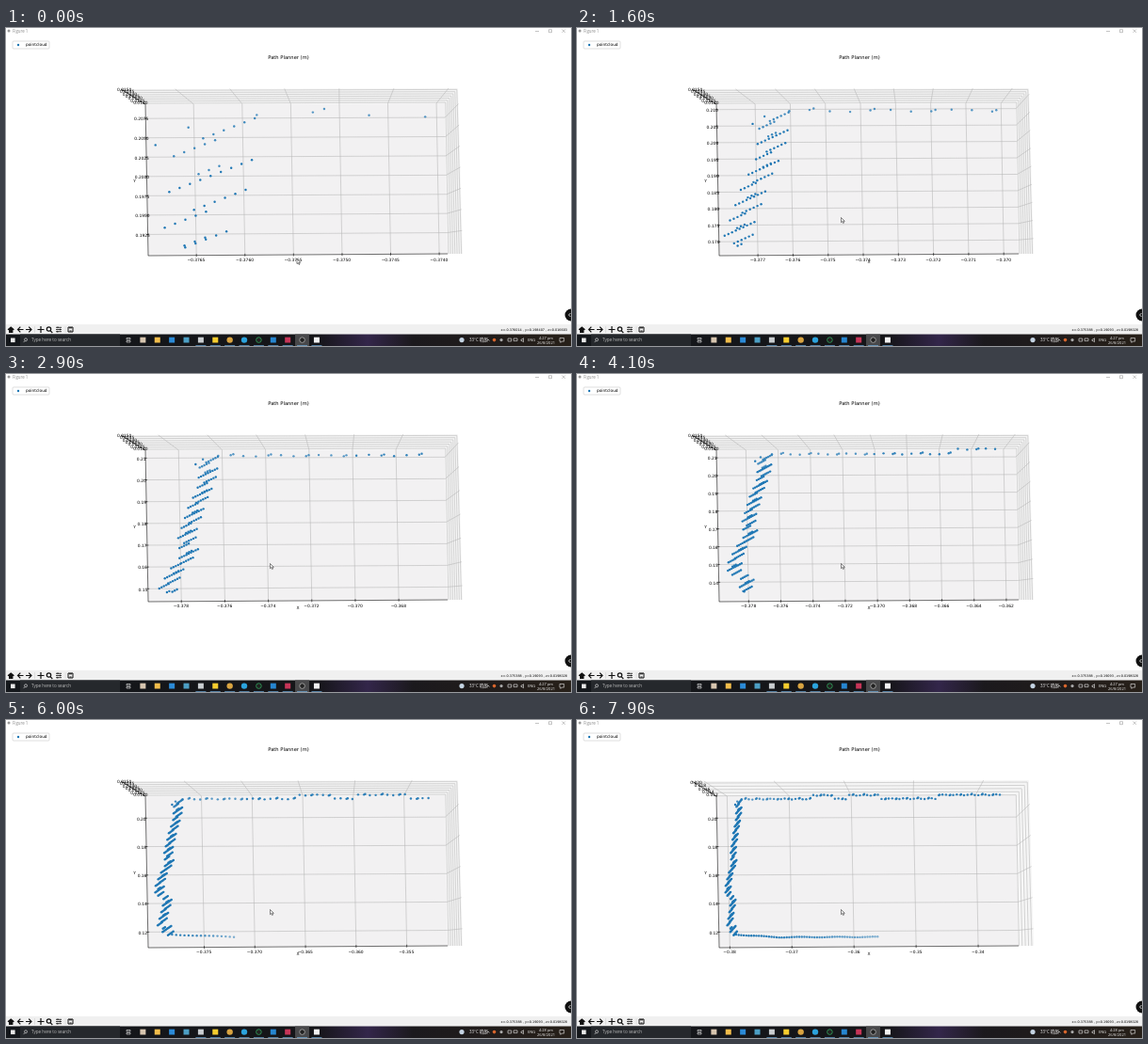
These frames come from a looping animation (600x338 px, 8 s). An HTML page:

```html
<!DOCTYPE html>
<html lang="en">
<head>
<meta charset="utf-8">
<title>Path Planner</title>
<style>
html, body { margin: 0; width: 100%; height: 100%; overflow: hidden; background: #fff; }
svg { display: block; width: 100vw; height: 100vh; }
text { font-family: "DejaVu Sans", sans-serif; font-size: 4.4px; }
.ui { font-family: "Open Sans", "Noto Sans CJK SC", "Noto Sans CJK", sans-serif; }
.mid { text-anchor: middle; }
.grid { fill: none; stroke: #b4b4b4; stroke-width: .55; }
.axis { fill: none; stroke: #111; stroke-width: .6; }
.tool { fill: none; stroke: #111; stroke-width: 1.2; }
.thin { fill: none; stroke: #eee; stroke-width: .6; }
</style>
</head>
<body>
<svg viewBox="0 0 600 338" preserveAspectRatio="none">
  <defs>
    <linearGradient id="bar">
      <stop offset="0" stop-color="#14171b"/><stop offset=".55" stop-color="#151518"/>
      <stop offset=".64" stop-color="#33264a"/><stop offset=".72" stop-color="#1b191d"/>
      <stop offset="1" stop-color="#272019"/>
    </linearGradient>
  </defs>
  <rect width="600" height="338" fill="#fff"/>
  <circle cx="3" cy="3" r="1.5" fill="#999"/>
  <text class="ui" x="7" y="4.8" fill="#888">Figure 1</text>
  <path d="M562 3.5h4M576.5 1.7h3v3h-3zM590.5 1.5l3.4 3.4m0-3.4l-3.4 3.4" fill="none" stroke="#888" stroke-width=".5"/>
  <rect x="7" y="14" width="39" height="8" rx="1" fill="#fff" stroke="#ccc" stroke-width=".6"/>
  <circle cx="13" cy="18" r="1.2" fill="#1f77b4"/>
  <text x="21" y="19.4" style="font-size:4.3px">pointcloud</text>
  <text class="mid" x="300" y="33" style="font-size:5.2px">Path Planner (m)</text>

  <g id="plot"></g>

  <rect y="315" width="600" height="10.5" fill="#f0f0f0"/>
  <g class="tool">
    <path d="M2 320.8l3.2-2.8 3.2 2.8M3.6 320.5v3h3.2v-3z" fill="#111"/>
    <path d="M18.5 320.5h-6m2.8-2.8l-2.8 2.8 2.8 2.8M21 320.5h6m-2.8-2.8l2.8 2.8-2.8 2.8"/>
    <path d="M33.5 320.5h7M37 317v7"/>
    <circle cx="45.5" cy="320" r="2.2"/><path d="M47 321.7l2.3 2.3"/>
    <path d="M53 318.3h6M53 320.5h6M53 322.7h6M55 317.4v1.8M57.4 319.6v1.8M54.8 321.8v1.8" stroke-width=".8"/>
    <path d="M66 318h5v5h-5zM67 318.8h3M67.5 322h2" stroke-width="1"/>
  </g>
  <path d="M30.5 317v7M63 317v7" stroke="#ccc" stroke-width=".5"/>
  <text id="status" x="596" y="322" text-anchor="end" style="font-size:3.4px"></text>
  <circle cx="600" cy="305" r="6.5" fill="#111"/>
  <path d="M599.5 303l-2 2 2 2" fill="none" stroke="#fff" stroke-width=".8"/>

  <rect y="325.5" width="600" height="12.5" fill="url(#bar)"/>
  <rect x="15" y="325.5" width="106" height="12.5" fill="#25282c"/>
  <rect x="5" y="329.5" width="4.6" height="4.6" fill="#e8e8e8"/>
  <circle class="thin" cx="21" cy="331.3" r="1.5"/>
  <path class="thin" d="M20 332.5l-1.4 1.6"/>
  <text class="ui" x="27" y="333.4" fill="#bbb" style="font-size:4.6px">Type here to search</text>
  <g id="icons"></g>
  <g fill="#eee">
    <circle cx="484" cy="331.6" r="2.6" fill="#c4d3e2"/>
    <text class="ui" x="492" y="333.4">33°C 晴朗</text>
    <path class="thin" d="M510.5 332.5l1.5-1.5 1.5 1.5M533 330h3.6v3h-3.6zM539 330h4v2.6h-4zM547 331v1.5h1l1.5 1.2v-4l-1.5 1.3z"/>
    <circle cx="518.5" cy="331.6" r="1.8" fill="#d9662d"/><circle cx="526" cy="331.6" r="1.6" fill="#aaa"/>
    <text class="ui" x="554" y="333.2" style="font-size:4px">ENG</text>
    <text class="ui mid" id="clock" x="573.5" y="330.5" style="font-size:4px"></text>
    <text class="ui mid" x="573.5" y="336.3" style="font-size:4px">26/8/2021</text>
    <path class="thin" d="M588 329.5h4.6v3.6h-2.4l-1.2 1.3v-1.3h-1z"/>
  </g>
  <path id="cursor" d="M0 0v5.2l1.3-1.1 .8 1.9 .9-.4-.8-1.8h1.6z" fill="#fff" stroke="#111" stroke-width=".5"/>
</svg>
<script>
const LOOP = 8000, STEP = 100;
const $ = id => document.getElementById(id);
const mix = (a, b, k) => a + (b - a) * k;

// piecewise linear curve through a few points, flat outside them
const curve = (...pts) => x => {
  const i = pts.findIndex(p => p[0] > x);
  if (i < 0) return pts[pts.length - 1][1];
  if (!i) return pts[0][1];
  const [a, b] = [pts[i - 1], pts[i]];
  return mix(a[1], b[1], (x - a[0]) / (b[0] - a[0]));
};

// extents of the scanned cloud over seconds; x in 1e-5 from -0.38, y in 1e-4
const right = curve([0, 589], [1.6, 988], [2.9, 1337], [4.1, 1758], [6, 2715], [7.2, 3712], [7.9, 4344]);
const left = curve([0, 320], [1.6, 244], [2.9, 135]);
const low = curve([0, 1910], [1.6, 1687], [2.9, 1485], [4.1, 1345], [5, 1158]);
const high = curve([0, 2081], [2.9, 2092], [5, 2086]);
const trailEnd = curve([4.9, 0], [5, 300], [6, 903], [7.9, 2464]);

// left edge of the slanted scan rows at height y
const edge = curve([1170, 255], [1240, 182], [1345, 225], [1412, 247], [1433, 165], [1495, 167],
  [1575, 213], [1640, 268], [1705, 252], [1865, 308], [1920, 342], [2040, 356]);

const cloud = [];
const add = (x, y, alpha = 1) => cloud.push({x, y, alpha});
for (let i = 0, y = 2040; y > 1175; i++, y -= 21.6)
  for (let j = 0; j < [6, 5, 3, 9][i % 4]; j++)
    add(edge(y) + 13 * Math.cos(Math.PI * i) + 10 * j, y + 4.8 * j, y > 1985 ? .85 : 1);
add(323, 2032);
add(355, 2053, .85);

const raised = x => x > 1476 && x < 1780 || x > 2024 && x < 2500 || x > 3380;
for (let i = 0, x = 421; x < 4400; i++, x += 54) {
  const y = (raised(x) ? 2092 : 2068) + 3 * Math.sin(1.7 * i), alpha = x < 1000 ? .75 : .92;
  add(x, y, alpha);
  if (i % 3 === 1) add(x + 11, y + 4, alpha);
}

function ticks(lo, hi) {
  const raw = (hi - lo) / 9.375, mag = 10 ** Math.floor(Math.log10(raw));
  const step = mag * [1, 2, 2.5, 5, 10].find(s => s * mag >= raw * .9999);
  let digits = 2;
  while (digits < 5 && Math.abs(step * 10 ** digits - Math.round(step * 10 ** digits)) > 1e-6) digits++;
  const pad = .02 * (hi - lo), list = [];
  for (let n = Math.ceil((lo + pad) / step); n * step <= hi - pad; n++)
    list.push([(n * step - lo) / (hi - lo), (n * step).toFixed(digits).replace("-", "−")]);
  return list;
}

// fx runs right, fy runs down, w rises from floor to lid
const project = (fx, fy, w = 0) => [
  mix(148 + 3 * fy + 318 * fx, 122 - 4 * fy + fx * (358 + 9 * fy), w),
  mix(81 - fx + fy * (161 - fx), 65 - fx + 176 * fy, w)
];
const line = (...pts) => "M" + pts.map(p => p.map(v => v.toFixed(2)).join(" ")).join("L");
const label = (x, y, s) => `<text class="mid" x="${x.toFixed(2)}" y="${y.toFixed(2)}">${s}</text>`;
const widen = (a, b) => [a - .073 * (b - a), b + .073 * (b - a)];

function plot(t) {
  let grid = "", marks = "", labels = "", dots = "";
  const P = project;
  const [x0, x1] = widen(left(t), right(t)), [y0, y1] = widen(low(t), high(t));
  const lid = t < 7.3 ? .0153 : .0212;

  for (const [f, s] of ticks(x0 * 1e-5 - .38, x1 * 1e-5 - .38)) {
    const [x, y] = P(f, 1);
    grid += line([x, y], P(f, 0), P(f, 0, 1));
    marks += line([x, y - 1.5], [x, y + 1.5]);
    labels += label(x - .3, 248, s);
  }
  for (const [f, s] of ticks(y0 * 1e-4, y1 * 1e-4)) {
    const fy = 1 - f, [x, y] = P(0, fy);
    grid += line([x, y], P(1, fy), P(1, fy, 1));
    marks += line([x - 1.5, y], [x + 1.5, y]);
    labels += label(143.5 + 2 * fy, y + 2.3, s);
  }
  for (const [w, s] of ticks(.0118, lid)) {
    const [x, y] = P(0, 0, w);
    grid += line([x, y], P(1, 0, w), P(1, 1, w));
    marks += line([x - 1.5, y - .5], [x + 1.5, y + .5]);
    labels += label(x - 4 + 6 * w, y + .8, s);
  }

  const dot = (x, y, alpha) => {
    const fx = (x - x0) / (x1 - x0), fy = (y1 - y) / (y1 - y0);
    const px = 132.7 + 3.3 * fy + 340.3 * fx, py = 70.4 + 172.3 * fy - fx;
    dots += `<circle cx="${px.toFixed(2)}" cy="${py.toFixed(2)}" r="1.2" opacity="${alpha.toFixed(2)}"/>`;
  };
  for (const {x, y, alpha} of cloud)
    if (x <= right(t) && y >= low(t) - 3) dot(x, y, alpha);
  for (let x = 300, end = trailEnd(t); x <= end; x += 38)
    dot(x, 1180 - 18 * Math.min(1, (x - 300) / 600) + 2 * Math.sin(x / 90), 1 - .5 * (x / end) ** 2);

  const pane = (fill, ...pts) => `<path d="${line(...pts)}Z" fill="${fill}"/>`;
  return pane("#f2f1f2", P(0, 0), P(1, 0), P(1, 1), P(0, 1)) +
    pane("#f5f5f5", P(0, 0), P(0, 0, 1), P(1, 0, 1), P(1, 0)) +
    pane("#f6f6f6", P(1, 0), P(1, 0, 1), P(1, 1, 1), P(1, 1)) +
    `<path class="grid" d="${grid}"/>` +
    `<path class="axis" d="${line(P(0, 0, 1), P(0, 0), P(0, 1), P(1, 1))}${marks}"/>` +
    labels + label(310, 249.7, "X") + label(136.5, 163.5, "Y") +
    `<g fill="#1f77b4">${dots}</g>`;
}

function drawIcons() {
  const colors = "#ddd #d8c6b0 #f2bd4b #2b8bd8 #4c9fc4 #c9cdd0 #f6cd2e #d9a441 #2ba3dd #2e9b57 #2686d0 #c73558 #a5a5a5 #f1f1f1";
  const shape = (kind, x, c) => ({
    r: `<circle cx="${x}" cy="331.6" r="3.2" fill="${c}"/>`,
    o: `<circle cx="${x}" cy="331.6" r="2.8" fill="#222" stroke="${c}" stroke-width=".9"/>`,
    s: `<rect x="${x - 3}" y="328.7" width="6" height="5.8" fill="${c}"/>`,
    t: `<path class="thin" d="M${x - 2} 329.5h4v1.6h-4zm0 2.9h4v1.6h-4z"/>`
  })[kind];
  $("icons").innerHTML = `<rect x="307" y="325.5" width="15" height="12.5" fill="#48484a"/>` +
    colors.split(" ").map((c, i) => {
      const x = 130 + 15.38 * i;
      const open = i > 4 ? `<path d="M${x - 5.5} 337.6h11" stroke="#76b9ed" stroke-width=".7"/>` : "";
      return shape("tssssssrrossos"[i], x, c) + open;
    }).join("");
}

const cursorPath = curve([.2, 0], [1.1, 1]);
let shown = -1;
function draw(ms) {
  const step = Math.floor(ms / STEP);
  if (step === shown) return;
  shown = step;
  const t = step * STEP / 1000, k = cursorPath(t);
  $("plot").innerHTML = plot(t);
  $("cursor").setAttribute("transform", `translate(${mix(309, 280.5, k)} ${mix(245.5, 201.5, k)})`);
  $("status").textContent = t < .9
    ? "x=-0.376014   , y=0.198407   , z=0.016603"
    : "x=-0.375388   , y=0.19093   , z=0.0198028";
  $("clock").textContent = t < 5 ? "4:27 pm" : "4:28 pm";
}

drawIcons();
const start = performance.now();
function tick(now) {
  draw(Math.max(0, now - start) % LOOP);
  requestAnimationFrame(tick);
}
draw(0);
requestAnimationFrame(tick);
</script>
</body>
</html>
```
